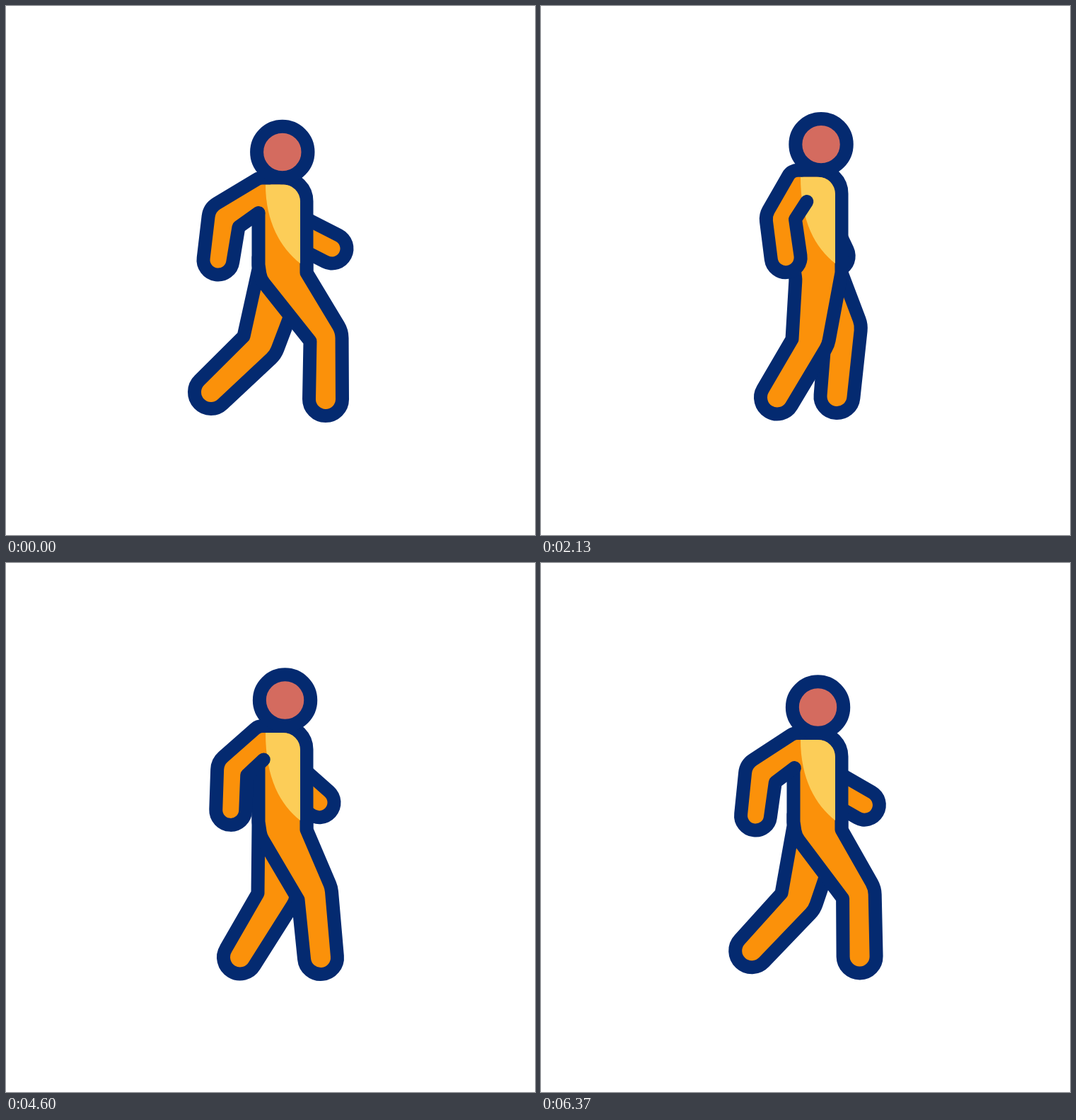
These frames come from a looping animation (748x748 px, 6400 ms). An HTML page with a canvas:

```html
<!DOCTYPE html>
<html lang="en">
<head>
<meta charset="utf-8">
<title>Walking figure</title>
<style>
  html, body { margin: 0; width: 100%; height: 100%; overflow: hidden; background: #fff; }
  canvas { display: block; width: 100vw; height: 100vh; }
</style>
</head>
<body>
<canvas id="stage" width="748" height="748"></canvas>
<script>
const ctx = document.getElementById('stage').getContext('2d');
const NAVY = '#042a70', ORANGE = '#fb910a', YELLOW = '#fccd58', SKIN = '#d46b5f';
const STROKE = 19, CYCLE = 1600, HALF = CYCLE / 2, LOOP = 6400;
const BACK = 357, FRONT = 425, HIP = 377;

// time in the stride, back of knee x y, front of knee x y, foot x y
const LEG = [
  [0, 430, 474, 475, 460, 452, 556],
  [520, 355, 471, 406, 479, 334, 553.5],
  [600, 356, 467, 409, 478, 331, 557.5],
  [800, 336, 467, 381, 493, 290, 546],
  [1320, 400, 489, 453, 451, 418.5, 552],
  [1400, 413, 476, 460, 459, 445, 558],
  [1600, 430, 474, 475, 460, 452, 556]
];
// height of the head within one step
const BOB = [[0, 206.5], [600, 194], [800, 206.5]];

function sample(keys, t) {
  const i = keys.findIndex(k => k[0] > t), a = keys[i - 1], b = keys[i];
  const f = (t - a[0]) / (b[0] - a[0]);
  return a.slice(1).map((v, n) => v + (b[n + 1] - v) * f);
}

// rounded end of a limb, running from its back edge to its front edge
function cap(path, fromX, fromY, x, y, r) {
  const a = Math.atan2(y - fromY, x - fromX);
  path.arc(x, y, r, a + Math.PI / 2, a - Math.PI / 2, true);
}

function addLeg(path, t) {
  const [bx, by, fx, fy, x, y] = sample(LEG, t % CYCLE);
  path.lineTo(bx, by);
  cap(path, (bx + fx) / 2, (by + fy) / 2, x, y, 23.5);
  path.arcTo(fx, fy, FRONT, HIP, 35);
  path.lineTo(FRONT, HIP);
}

function fill(path, color) {
  ctx.fillStyle = color;
  ctx.fill(path);
}

function outline(path, color = NAVY, width = STROKE) {
  ctx.strokeStyle = color;
  ctx.lineWidth = width;
  ctx.stroke(path);
}

function farArm(head, s) {
  const x = 461 - 72 * s, y = head + 136.5 + 33 * s;
  const a = (27 + 58 * s) * Math.PI / 180;
  const path = new Path2D();
  path.moveTo(x - 55 * Math.cos(a), y - 55 * Math.sin(a));
  path.lineTo(x, y);
  outline(path, NAVY, 61);
  outline(path, ORANGE, 23);
}

function farLeg(t) {
  const path = new Path2D();
  path.moveTo(BACK, 355);
  path.lineTo(BACK, 372);
  addLeg(path, t + HALF);
  path.lineTo(FRONT, 355);
  fill(path, ORANGE);
  outline(path);
}

function bodyAndArm(t, head, s) {
  const top = head + 36.5;
  const shoulder = 358 - 6 * s, neck = shoulder + 14;
  const pitX = 357 + 29 * s, pitY = head + 86 - 8 * s;

  const body = new Path2D();
  body.moveTo(BACK, pitY);
  const [kx, ky] = sample(LEG, t);
  body.lineTo(BACK, 366);
  body.arcTo(360, 386, kx, ky, 30);
  addLeg(body, t);
  body.arcTo(FRONT, top, neck, top, 33);
  body.lineTo(neck, top);
  fill(body, ORANGE);
  outline(body);

  const outX = 287.5 + 46 * s, outY = head + 79 + 33 * s;
  const inX = 329 + 47 * s, inY = head + 106;
  const handX = 300 + 71 * s, handY = head + 152.5 + 11.5 * s;
  const arm = new Path2D();
  arm.moveTo(neck, top);
  arm.arcTo(shoulder, top, outX, outY, 16);
  arm.arcTo(outX, outY, handX - 21, handY, 25);
  cap(arm, (outX + inX) / 2, (outY + inY) / 2, handX, handY, 21);
  arm.lineTo(inX, inY);
  arm.lineTo(pitX, pitY);
  const sleeve = new Path2D(arm);
  sleeve.lineTo(neck, top + 12);
  fill(sleeve, ORANGE);

  const light = new Path2D(), edge = top + STROKE / 2;
  light.moveTo(367, edge);
  light.bezierCurveTo(367, 305, 388, 342, 416, 364);
  light.arcTo(416, edge, 367, edge, 24);
  light.closePath();
  fill(light, YELLOW);
  outline(arm);
}

function drawHead(x, y) {
  const path = new Path2D();
  path.arc(x, y, 36.2, 0, 2 * Math.PI);
  fill(path, SKIN);
  outline(path);
}

// 25 poses a second, shown on a 30 Hz clock with ticks at 0, 30 and 70 ms
function poseTime(ms) {
  const r = ms % 100;
  const tick = Math.floor(ms / 100) * 3 + (r >= 30) + (r >= 70);
  return Math.floor(tick * 5 / 6) * 40;
}

function draw(ms) {
  const t = poseTime(ms % LOOP) % CYCLE, step = t % HALF;
  const swing = 1 - Math.abs(1 - t / HALF);
  const sway = 1 - Math.abs(1 - step / 400);
  const [head] = sample(BOB, step);
  ctx.clearRect(0, 0, 748, 748);
  ctx.lineJoin = ctx.lineCap = 'round';
  farArm(head, swing);
  farLeg(t);
  bodyAndArm(t, head, swing);
  drawHead(390.8 + 7.5 * sway, head);
}

const start = performance.now();
function tick() {
  draw(performance.now() - start);
  requestAnimationFrame(tick);
}
tick();
</script>
</body>
</html>
```
